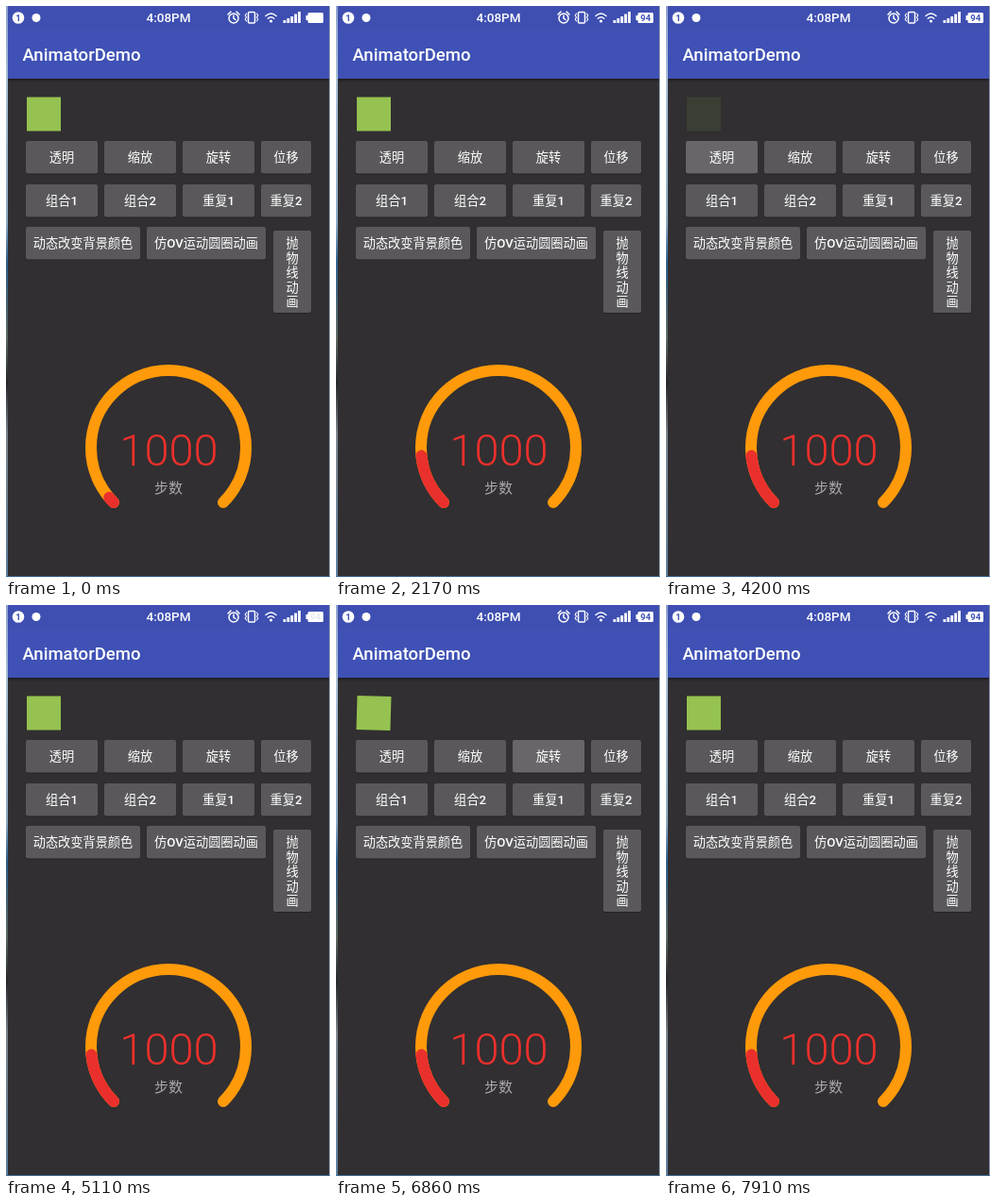
Animation of 343x605 px, one loop 8000 ms. Source, as an HTML page:

```html
<!DOCTYPE html>
<html lang="zh">
<head>
<meta charset="utf-8">
<style>
  html, body { margin: 0; width: 100%; height: 100%; overflow: hidden; background: #312f31; }
  svg { display: block; width: 343px; height: 605px; }
  text { font-family: Roboto, "Noto Sans CJK SC", "Noto Sans CJK", sans-serif; text-anchor: middle; fill: #fff; }
  .latin { font-weight: 500; }
  .line { fill: none; stroke: #fff; stroke-linecap: round; }
  .ring { fill: none; stroke-width: 12; stroke-linecap: round; }
</style>
</head>
<body>
<svg viewBox="0 0 343 605">
  <defs>
    <linearGradient id="edge" x2="0" y2="1">
      <stop offset="0" stop-color="#8fa0d0"/>
      <stop offset=".13" stop-color="#a9bfd4"/>
      <stop offset=".38" stop-color="#8aa9c4"/>
      <stop offset=".45" stop-color="#2c608e"/>
      <stop offset=".58" stop-color="#5d6a62"/>
      <stop offset=".66" stop-color="#25272b"/>
      <stop offset=".75" stop-color="#7c858c"/>
      <stop offset="1" stop-color="#5a7f9f"/>
    </linearGradient>
    <linearGradient id="shadow" x2="0" y2="1">
      <stop offset="0" stop-color="#1d1c22"/>
      <stop offset="1" stop-color="#312f31"/>
    </linearGradient>
  </defs>

  <rect width="343" height="605" fill="#312f31"/>
  <rect y="77" width="343" height="4" fill="url(#shadow)"/>
  <rect width="343" height="77" fill="#3f51b5"/>
  <rect width="343" height="24" fill="#3e4fb1"/>
  <rect width="2" height="605" fill="url(#edge)"/>
  <rect x="342" width="1" height="605" fill="#8793a8"/>
  <rect y="604" width="343" height="1" fill="#3f6f9c"/>

  <!-- Status bar -->
  <circle cx="13" cy="12.5" r="6.3" fill="#fff"/>
  <text x="13" y="16" font-size="9.5" font-weight="700" style="fill:#3f51b5">1</text>
  <circle cx="32" cy="12.5" r="4.5" fill="#fff"/>
  <text x="172" y="17" font-size="13.5" class="latin">4:08PM</text>
  <g class="line" stroke-width="1.5">
    <circle cx="241" cy="13" r="5"/>
    <path d="M241 10v3l2 1.5M235 9l3-3M247 9l-3-3"/>
    <rect x="256.5" y="6.5" width="7" height="11.5" rx="1"/>
    <path stroke-width="1.1" d="M254.5 8l-1.3 2 1.3 2-1.3 2 1.3 2M265.500 8l1.300 2-1.300 2 1.300 2-1.300 2"/>
    <path d="M275 10.500q5.500-5 11 0M277.300 13.200q3.200-3 6.400 0"/>
  </g>
  <circle cx="280.500" cy="16" r="1.600" fill="#fff"/>
  <path fill="#fff" d="M293.500 15h2.800v3h-2.800zM297.400 13h2.800v5h-2.800zM301.300 11h2.800v7h-2.800zM305.200 8.500h2.800v9.500h-2.800zM309.100 6h2.800v12h-2.800z"/>
  <rect x="317.500" y="10" width="3" height="5" fill="#fff"/>
  <rect x="319.500" y="7" width="16.500" height="11" rx="1.500" fill="#fff"/>
  <text id="charge" x="327.700" y="16" font-size="9.500" font-weight="700" style="fill:#3f51b5">94</text>

  <text x="80" y="58" font-size="18.6" class="latin">AnimatorDemo</text>
  <rect id="icon" x="-18" y="-18" width="36" height="36" fill="#95c250"/>
  <g id="buttons"></g>

  <!-- Step gauge -->
  <path class="ring" stroke="#ff9a0a" d="M114 526A82 82 0 1 1 230 526"/>
  <path id="progress" class="ring" stroke="#ea302c"/>
  <text x="172.500" y="487" font-size="47" font-weight="300" style="fill:#ea302c">1000</text>
  <text x="172" y="516" font-size="15" style="fill:#aaa8aa">步数</text>
</svg>
<script>
const LOOP = 8000;
const find = id => document.getElementById(id);
const clamp = v => Math.min(1, Math.max(0, v));
const ease = v => (1 - Math.cos(Math.PI * clamp(v))) / 2;

// Label, x, y, width, optional time of the tap
const buttons = [
  ["透明", 21, 143, 76, 3900], ["缩放", 104, 143, 76, 5700],
  ["旋转", 187, 143, 76, 6720], ["位移", 270, 143, 53],
  ["组合1", 21, 189, 76], ["组合2", 104, 189, 76],
  ["重复1", 187, 189, 76], ["重复2", 270, 189, 53],
  ["动态改变背景颜色", 21, 234, 121], ["仿OV运动圆圈动画", 149, 234, 126],
  ["抛物线动画", 283, 238, 40]
];

function buttonMarkup([label, x, y, width], index) {
  const vertical = index === buttons.length - 1;
  const height = vertical ? 87 : 34.5;
  const lines = vertical ? [...label] : [label];
  const texts = lines.map((line, i) =>
    `<text x="${x + width / 2}" y="${y + (vertical ? 18 : 22.2) + i * 15.5}" font-size="13.2">${
      line.replace(/[A-Z0-9]+/g, '<tspan class="latin">$&</tspan>')}</text>`).join("");
  return `<rect x="${x}" y="${y + 1}" width="${width}" height="${height}" rx="2" fill="#242325"/>
    <rect class="face" x="${x}" y="${y}" width="${width}" height="${height}" rx="2"/>${texts}`;
}

find("buttons").innerHTML = buttons.map(buttonMarkup).join("");
const faces = document.querySelectorAll(".face");

function pressAmount(age) {
  return clamp(age / 100) * (1 - clamp((age - 330) / 200));
}

function draw(t) {
  const angle = (135 + 39 * ease((t + 655) / 2850)) * Math.PI / 180;
  const endX = 172 + 82 * Math.cos(angle), endY = 468 + 82 * Math.sin(angle);
  find("progress").setAttribute("d", `M114 526A82 82 0 0 1 ${endX} ${endY}`);

  const alpha = t < 3995 ? 1 : ease((t - 3995) / 1000);
  const scale = t < 5736 ? 1 : ease((t - 5736) / 1000);
  const turn = 360 * ease((t - 6818) / 1000);
  find("icon").setAttribute("opacity", alpha);
  find("icon").setAttribute("transform", `translate(40 114.500) rotate(${turn}) scale(${scale})`);

  // The charge level blinks out and fades back
  find("charge").setAttribute("opacity", t < 420 ? 0 : clamp((t - 420) % 2310 / 560));

  buttons.forEach(([, , , , tap], i) => {
    const glow = tap ? 14 * pressAmount(t - tap) : 0;
    faces[i].setAttribute("fill", `rgb(${90 + glow},${88 + glow},${91 + glow})`);
  });
}

const start = performance.now();
function tick() {
  draw((performance.now() - start) % LOOP);
  requestAnimationFrame(tick);
}
tick();
</script>
</body>
</html>
```
